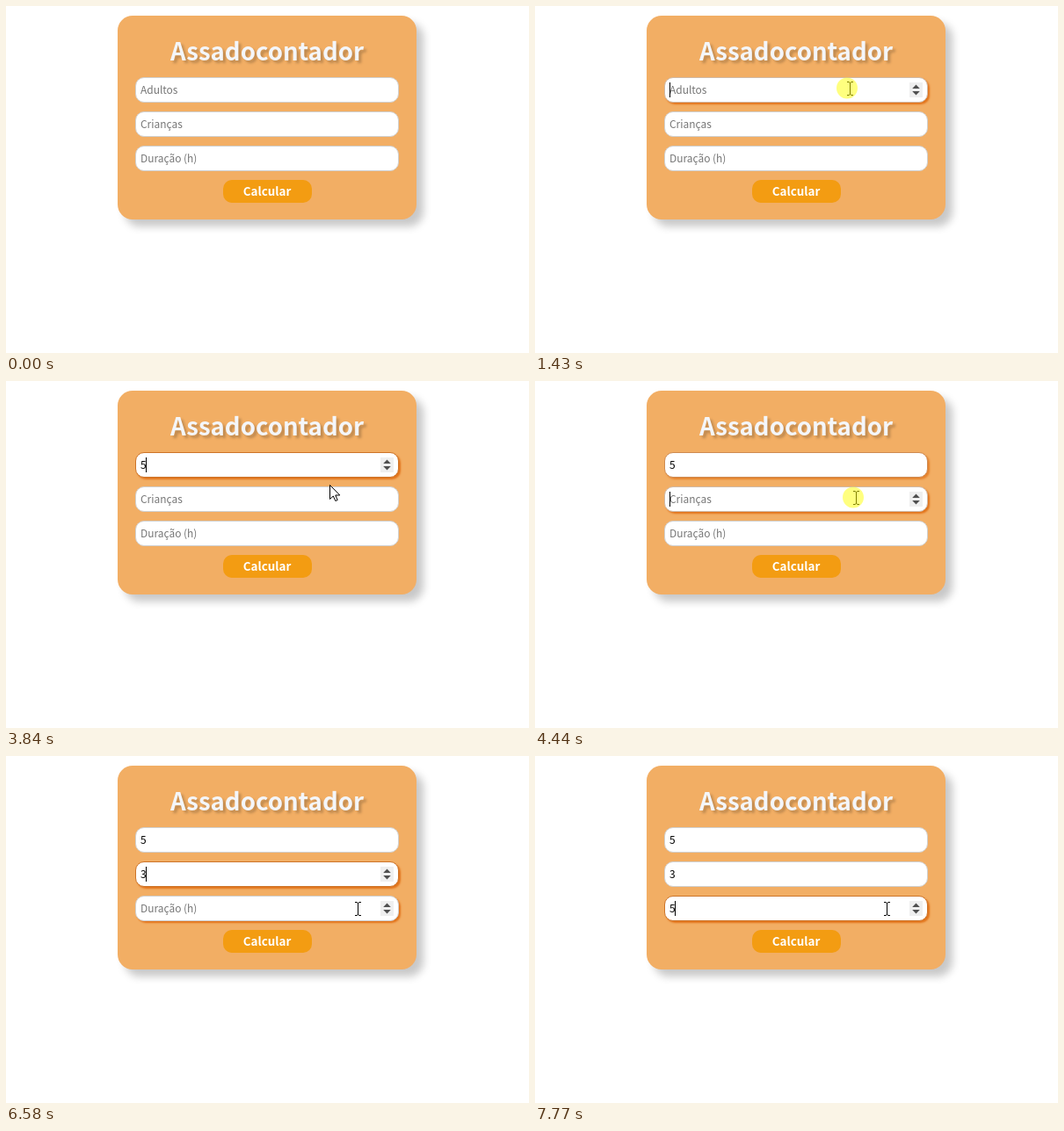
These frames come from a looping animation (595 by 395 pixels, 8 s). An HTML page:

```html
<!DOCTYPE html>
<html lang="pt-BR">
<head>
<meta charset="utf-8">
<title>Calculadora</title>
<style>
  html, body { margin: 0; width: 100%; height: 100%; overflow: hidden; background: #fff; }
  #stage { position: relative; width: 595px; height: 395px; overflow: hidden; }
  #stage > * { position: absolute; box-sizing: border-box; }
  .card { left: 127px; top: 11px; width: 340px; height: 232px; border-radius: 17px;
    background: #f2ae64; box-shadow: 8px 8px 10px rgba(0, 0, 0, .22); }
  .field { left: 147px; width: 300px; height: 29px; border: 1px solid; border-radius: 10px; background: #fff; }
  .button { left: 247px; top: 198px; width: 101px; height: 26px; border-radius: 10px; background: #f39c12; }
  svg { left: 0; top: 0; }
  text { font: 400 11.94px "Noto Sans CJK JP", "Noto Sans CJK SC", "Noto Sans CJK", "Noto Sans", sans-serif; }
  text.title { font-size: 27.6px; font-weight: 700; fill: #f4f6fa; text-anchor: middle;
    text-shadow: 3px 3px 3px rgba(0, 0, 0, .22); }
  text.label { font-size: 13.4px; font-weight: 700; fill: #fff; text-anchor: middle; }
</style>
</head>
<body>
<div id="stage">
  <div class="card"></div>
  <div class="button"></div>
  <svg id="art" width="595" height="395" viewBox="0 0 595 395">
    <text class="title" x="297" y="62">Assadocontador</text>
    <text class="label" x="297" y="216">Calcular</text>
  </svg>
</div>
<script>
const LOOP = 8000, FADE = 300, BLINK = 532;
const stage = document.getElementById('stage');
const art = document.getElementById('art');

// focus, blur and typing times in ms
const fields = [
  { y: 81, hint: 'Adultos', value: '5', focus: 1360, blur: 4380, typed: 2760 },
  { y: 120, hint: 'Crianças', value: '3', focus: 4380, blur: 6710, typed: 5430 },
  { y: 159, hint: 'Duração (h)', value: '5', focus: 6710, blur: LOOP, typed: 7770 }
];

// pointer path: time, x, y
const path = [
  [190, 577, 386], [500, 500, 268], [760, 405, 150], [950, 360, 99], [1020, 358, 94],
  [1880, 358, 94], [1970, 372, 91], [3070, 372, 91], [3300, 435, 83],
  [3480, 435, 83], [3840, 368, 118], [4080, 368, 118], [4240, 365, 133],
  [4560, 365, 133], [4710, 365, 129], [5880, 365, 129], [6500, 400, 174]
];
const clicks = [[1360, 1560], [4380, 4580], [6710, 6910]];

function add(tag, attrs, parent = art) {
  const el = document.createElementNS('http://www.w3.org/2000/svg', tag);
  for (const k in attrs) el.setAttribute(k, attrs[k]);
  return parent.appendChild(el);
}
const show = (el, on) => { el.style.display = on ? '' : 'none'; };
const mix = (a, b, k) => 'rgb(' + a.map((v, i) => Math.round(v + (b[i] - v) * k)) + ')';

for (const f of fields) {
  f.box = document.createElement('div');
  f.box.className = 'field';
  f.box.style.top = f.y + 'px';
  stage.insertBefore(f.box, art);
  f.text = add('text', { x: 153, y: f.y + 19 });
  f.spin = add('g', { transform: `translate(426 ${f.y + 6})` });
  add('rect', { width: 15, height: 17, fill: '#efefef' }, f.spin);
  add('path', { d: 'M3.2 7L7.5 2.5L11.8 7ZM3.2 10L7.5 14.5L11.8 10Z', fill: '#505050' }, f.spin);
}
const caret = add('rect', { width: 1, height: 17, fill: '#000' });
const beam = add('path', {
  d: 'M-3 -7.5H-1L.5 -6.5L2 -7.5H4M.5 -6.5V6.5M-3 7.5H-1L.5 6.5L2 7.5H4',
  fill: 'none', stroke: '#000', 'stroke-width': 1
});
const arrow = add('path', {
  d: 'M.5 .5V16.5L4.3 13L6.8 18.5L9.2 17.5L6.8 12H11.8Z', fill: '#fff', stroke: '#000'
});
const halo = add('circle', { r: 12, fill: '#ff0', opacity: .5 });

function pointer(t) {
  if (t < path[0][0]) return null;
  const i = path.findIndex(p => p[0] > t);
  if (i < 0) return path[path.length - 1].slice(1);
  const [t0, x0, y0] = path[i - 1], [t1, x1, y1] = path[i];
  const k = (t - t0) / (t1 - t0);
  return [x0 + (x1 - x0) * k, y0 + (y1 - y0) * k];
}
const focused = (f, t) => t >= f.focus && t < f.blur;
function hovered(f, t) {
  const p = pointer(t);
  return !!p && p[0] > 147 && p[0] < 447 && p[1] >= f.y && p[1] < f.y + 29;
}
// share of the recent past in which a state held, for a timed fade
function fade(state, t) {
  let sum = 0;
  for (let i = 0; i < 20; i++) sum += state(t - i * FADE / 20) ? 1 : 0;
  return sum / 20;
}

function draw(t) {
  let active = null, over = false;
  for (const f of fields) {
    const focus = focused(f, t), hover = hovered(f, t), typed = t >= f.typed;
    if (focus) active = f;
    over = over || hover;
    const glow = fade(s => focused(f, s) || hovered(f, s), t);
    f.box.style.boxShadow = `2px 2px 2px rgba(226, 116, 28, ${glow})`;
    f.box.style.borderColor = mix([208, 208, 208], [205, 116, 40], fade(s => focused(f, s), t));
    f.text.textContent = typed ? f.value : f.hint;
    f.text.setAttribute('fill', typed ? '#000' : '#757575');
    show(f.spin, focus || hover);
  }

  show(caret, false);
  if (active) {
    const typed = t >= active.typed;
    const since = t - (typed ? active.typed : active.focus);
    show(caret, Math.floor(since / BLINK) % 2 === 0);
    caret.setAttribute('x', typed ? 159 : 153);
    caret.setAttribute('y', active.y + 6);
  }

  const p = pointer(t);
  show(beam, p && over);
  show(arrow, p && !over);
  show(halo, p && clicks.some(([a, b]) => t >= a && t < b));
  if (p) {
    const [x, y] = p.map(Math.round);
    for (const el of [beam, arrow]) el.setAttribute('transform', `translate(${x} ${y})`);
    halo.setAttribute('cx', x - 3);
    halo.setAttribute('cy', y - .5);
  }
}

const start = performance.now();
function tick() {
  draw((performance.now() - start) % LOOP);
  requestAnimationFrame(tick);
}
draw(0);
requestAnimationFrame(tick);
</script>
</body>
</html>
```
